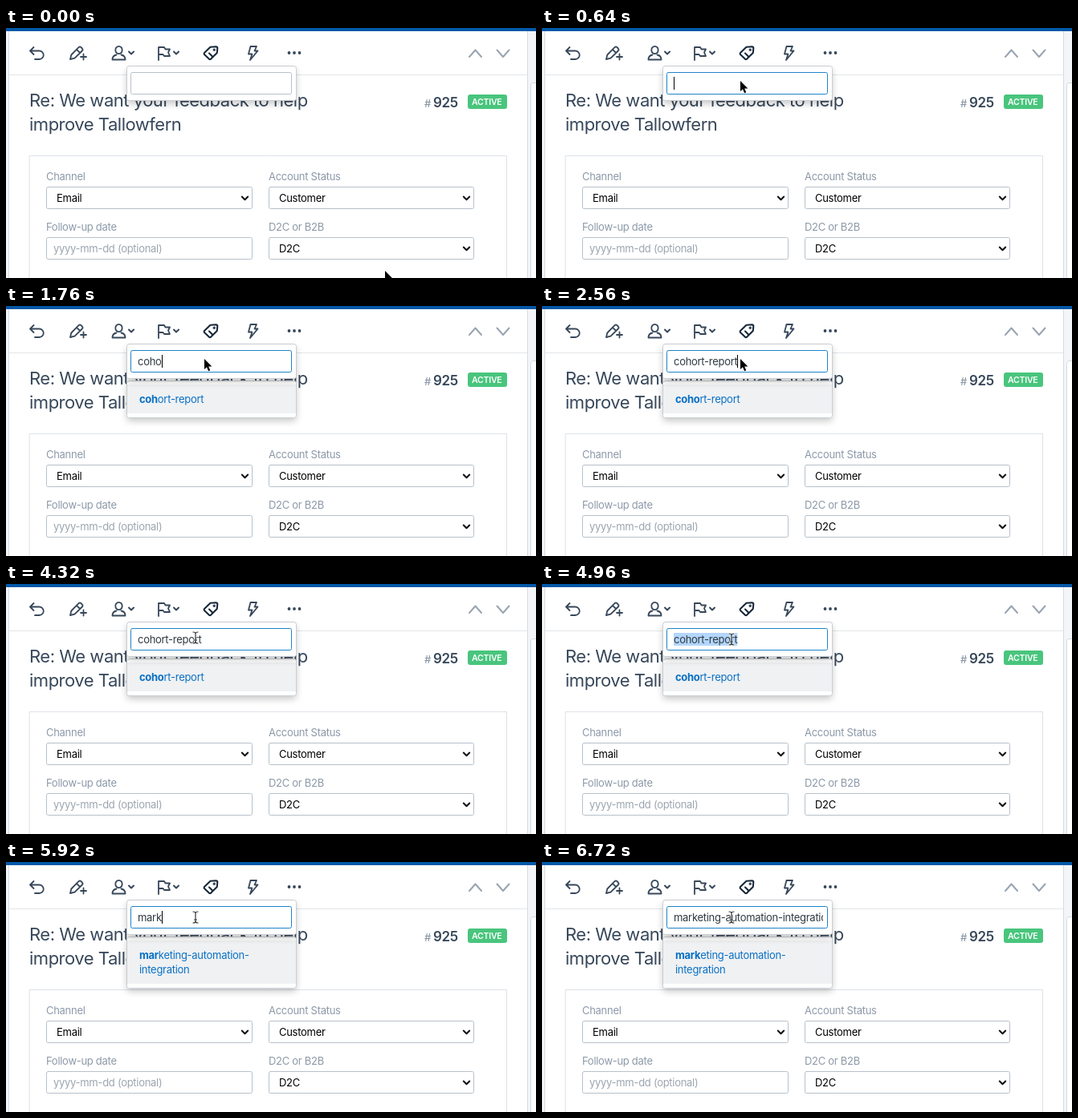
An HTML page with a canvas that plays this animation: 660 by 312 pixels, repeating every 8000 ms.

```html
<!DOCTYPE html>
<html lang="en">
<head>
<meta charset="utf-8">
<title>Tag picker</title>
<style>
html, body { margin: 0; width: 100%; height: 100%; overflow: hidden; background: #fff; }
canvas { display: block; width: 660px; height: 312px; }
</style>
</head>
<body>
<canvas id="stage" width="660" height="312"></canvas>
<script>
const ctx = document.getElementById('stage').getContext('2d');
const LOOP = 8000, TICK = 160;
const INK = '#37475a', MUTED = '#8c99a8', TEXT = '#535e6b', LINK = '#0a70c4';

const C_TAGS = ['alerts-change-request', 'cancel-page-chat', 'cindervex', 'cravolin', 'churn-consult', 'clov'];
const M_TAGS = ['demo-scheduled', 'edit-email-alerts', 'everlymoss', 'export-custom-fields',
  'marketing-automation-\nintegration', 'on-media'];
const cohort = query => ({ tags: ['cohort-report'], query, active: true });
const marketing = query => ({ tags: [M_TAGS[4]], query, active: true });

// Each step changes only the listed parts of the state.
const steps = [
  { at: 0, text: '', caret: false, focus: false, list: null, select: null, pointer: 'arrow', x: 472, y: 303 },
  { at: 160, x: 404, y: 232 },
  { at: 320, x: 292, y: 112 },
  { at: 480, x: 251, y: 70, focus: true, caret: true },
  { at: 640, x: 247, y: 66 },
  { at: 960, caret: false },
  { at: 1440, text: 'co', caret: true, list: { tags: C_TAGS, query: 'c', thumb: 106 } },
  { at: 1600, text: 'coh' },
  { at: 1760, text: 'coho', list: cohort('coh') },
  { at: 2240, caret: false },
  { at: 2560, text: 'cohort-report', caret: true, list: cohort('coho') },
  { at: 3040, caret: false },
  { at: 3520, caret: true },
  { at: 4000, caret: false, x: 249, y: 61 },
  { at: 4160, pointer: 'beam', x: 240, y: 59 },
  { at: 4320, x: 236, y: 67 },
  { at: 4480, y: 68 },
  { at: 4640, y: 69 },
  { at: 4800, select: 'cohort-' },
  { at: 4960, select: '' },
  { at: 5280, text: '', select: null, caret: true, list: null },
  { at: 5600, text: 'ma', list: { tags: M_TAGS, query: 'm', thumb: 230 } },
  { at: 5760, text: 'mar' },
  { at: 5920, text: 'mark', list: marketing('mar') },
  { at: 6400, caret: false },
  { at: 6720, text: 'marketing-automation-integration', list: marketing('mark') }
];

const stateAt = time => Object.assign({}, ...steps.filter(s => s.at <= time));

function setFont(size, weight = 400) {
  ctx.font = `${weight} ${size}px Inter, sans-serif`;
  ctx.letterSpacing = `${-0.022 * size}px`;
}

function write(str, x, y, color, size = 13, weight = 400) {
  setFont(size, weight);
  ctx.fillStyle = color;
  ctx.fillText(str, x, y);
  return ctx.measureText(str).width;
}

function fill(color, x, y, w, h) {
  ctx.fillStyle = color;
  ctx.fillRect(x, y, w, h);
}

function box(x, y, w, h, r, background, border) {
  ctx.beginPath();
  ctx.roundRect(x + .5, y + .5, w - 1, h - 1, r);
  if (background) { ctx.fillStyle = background; ctx.fill(); }
  if (border) { ctx.strokeStyle = border; ctx.lineWidth = 1; ctx.stroke(); }
}

function stroke(d, color = INK, width = 1.8) {
  ctx.strokeStyle = color;
  ctx.lineWidth = width;
  ctx.lineCap = ctx.lineJoin = 'round';
  ctx.stroke(new Path2D(d));
}

function dot(x, y, r) {
  ctx.fillStyle = INK;
  ctx.beginPath();
  ctx.arc(x, y, r, 0, Math.PI * 2);
  ctx.fill();
}

function panel(y, h) {
  ctx.save();
  ctx.shadowColor = 'rgba(0,0,0,.22)';
  ctx.shadowBlur = 9;
  ctx.shadowOffsetY = 4;
  box(150, y, 212, h, 3, '#fff');
  ctx.restore();
  box(150, y, 212, h, 3, '#fff', '#c9cdd2');
}

function drawToolbar() {
  stroke('M34.5 24L30 28.5L34.5 33M30.5 28.5H41.5A5.2 5.2 0 0 1 41.5 39H36');
  stroke('M80 39L81.3 33.5L90.5 24.2Q92 22.8 93.5 24.2L94.8 25.5Q96.2 27 94.8 28.5L85.5 37.7ZM88 26.8L92.2 31M96.5 32.5V39.5M93 36H100');
  stroke('M136.3 27.5A4.2 4.7 0 1 1 144.7 27.5A4.2 4.7 0 1 1 136.3 27.5M132.5 39.5Q132.5 34.5 137.5 33.5M143.5 33.5Q148.5 34.5 148.5 39.5H132.5');
  stroke('M153 29.5L156 32.5L159 29.5', INK, 2);
  stroke('M190 40V24H197L198.5 26.5H204L202 30.5L204 35H197L195.5 33H190');
  stroke('M209 29.5L212 32.5L215 29.5', INK, 2);
  stroke('M247 31L254.5 23.8L261.5 23.2Q263.3 23.2 263.3 25L262.8 31L255.2 38.6Q254 39.6 252.8 38.6L247 33Q246.2 32 247 31ZM253 31.5L256.5 35', '#18283a', 2.1);
  dot(259.3, 27.3, 1.7);
  stroke('M304.5 23H312L309.5 28.5H313.5L304 40L306.5 32.5H302Z');
  [352.5, 359, 365.5].forEach(x => dot(x, 31, 1.9));
  stroke('M577 36L584.5 27.5L592 36', '#98a4b1', 2);
  stroke('M611.5 27.5L619 36L626.5 27.5', '#98a4b1', 2);
}

function field(label, value, x, y, isSelect) {
  write(label, x, y, MUTED);
  const w = x < 100 ? 257 : 256;
  box(x, y + 8, w, 28, 2, '#fff', '#b6c0ca');
  write(value, x + (isSelect ? 13 : 9), y + 27, isSelect ? '#000' : '#9ba5af');
  if (isSelect) {
    const cx = x + w - 9.5, cy = y + 20.5;
    stroke(`M${cx - 3.7} ${cy}l3.7 3.8l3.7 -3.8`, '#111', 2);
  }
}

function drawPage() {
  fill('#fff', 0, 0, 660, 312);
  fill('#f3f5f8', 0, 4, 3, 308);
  fill('#d5dbe2', 3, 4, 1, 308);
  fill('#f3f5f8', 650, 4, 10, 308);
  fill('#d5dbe2', 649, 4, 1, 308);
  box(653, 68, 20, 260, 3, '#fff', '#d5dbe2');
  fill('#0058a8', 0, 0, 660, 4);
  fill('#e1e5e9', 4, 58, 645, 1);
  drawToolbar();

  write('Re: We want your feedback to help', 29, 98, INK, 22);
  write('improve Tallowfern', 29, 128, INK, 22);
  write('#', 521, 99, MUTED, 13, 500);
  write('925', 532, 99, INK, 17, 600);
  box(575, 83, 49, 18, 2, '#49c57d', '#49c57d');
  write('ACTIVE', 580, 96, '#fff', 10.5, 600);

  box(29, 159, 595, 200, 0, '#fff', '#dde2e7');
  field('Channel', 'Email', 50, 190, true);
  field('Account Status', 'Customer', 327, 190, true);
  field('Follow-up date', 'yyyy-mm-dd (optional)', 50, 253, false);
  field('D2C or B2B', 'D2C', 327, 253, true);
}

function writeMatches(line, query, y, color) {
  let x = 166;
  line.split(new RegExp(`(${query})`)).forEach((part, i) => {
    x += write(part, x, y, color, 13, i % 2 ? 700 : 400);
  });
}

function drawList({ tags, query, active, thumb }) {
  const heights = tags.map(tag => 18 + 18 * tag.split('\n').length);
  const total = heights.reduce((a, b) => a + b, 0);
  panel(93, thumb ? 240 : total + 11);
  let y = 98;
  tags.forEach((tag, i) => {
    if (active) fill('#eff1f3', 151, y, 210, heights[i]);
    tag.split('\n').forEach((line, n) =>
      writeMatches(line, query, y + 23 + n * 18, active ? LINK : TEXT));
    y += heights[i];
  });
  if (thumb) {
    fill('#fafafa', 347, 94, 14, 218);
    fill('#e7e7e7', 346, 94, 1, 218);
    box(350, 96, 8, thumb, 4, '#c1c1c1');
  }
}

function drawInput({ text, caret, focus, select }) {
  panel(47, 44);
  box(155, 55, 201, 28, 2, '#fff', focus ? '#1f83c9' : '#b6c0ca');
  ctx.save();
  ctx.beginPath();
  ctx.rect(163, 57, 187, 24);
  ctx.clip();
  setFont(13);
  const end = 164 + ctx.measureText(text).width;
  if (select !== null) {
    const start = 164 + ctx.measureText(select).width;
    fill('#b3d6fd', start, 61, end - start, 16);
  }
  write(text, 164, 74, '#2f3941');
  if (caret) fill('#000', Math.round(end), 61, 1, 16);
  ctx.restore();
}

function drawPointer({ pointer, x, y }) {
  if (pointer === 'beam') {
    const d = `M${x - 3} ${y - 7}Q${x} ${y - 7} ${x} ${y - 5}Q${x} ${y - 7} ${x + 3} ${y - 7}`
      + `M${x} ${y - 5}V${y + 5}M${x - 3} ${y + 7}Q${x} ${y + 7} ${x} ${y + 5}Q${x} ${y + 7} ${x + 3} ${y + 7}`
      + `M${x - 1.5} ${y + 3}H${x + 1.5}`;
    stroke(d, 'rgba(255,255,255,.8)', 2.6);
    stroke(d, '#333', 1.2);
    return;
  }
  const d = `M${x} ${y}v13l3 -2.7l2.1 4.9l2.2 -1l-2.1 -4.7h4.2z`;
  stroke(d, '#fff', 1.6);
  ctx.fillStyle = '#000';
  ctx.fill(new Path2D(d));
}

function frame(now) {
  const time = Math.floor((now % LOOP) / TICK) * TICK;
  const state = stateAt(time);
  drawPage();
  if (state.list) drawList(state.list);
  drawInput(state);
  drawPointer(state);
  requestAnimationFrame(frame);
}

let origin;
requestAnimationFrame(function start(now) {
  origin = now;
  frame(0);
});
const draw = frame;
frame = now => draw(Math.max(0, now - origin));
</script>
</body>
</html>
```
